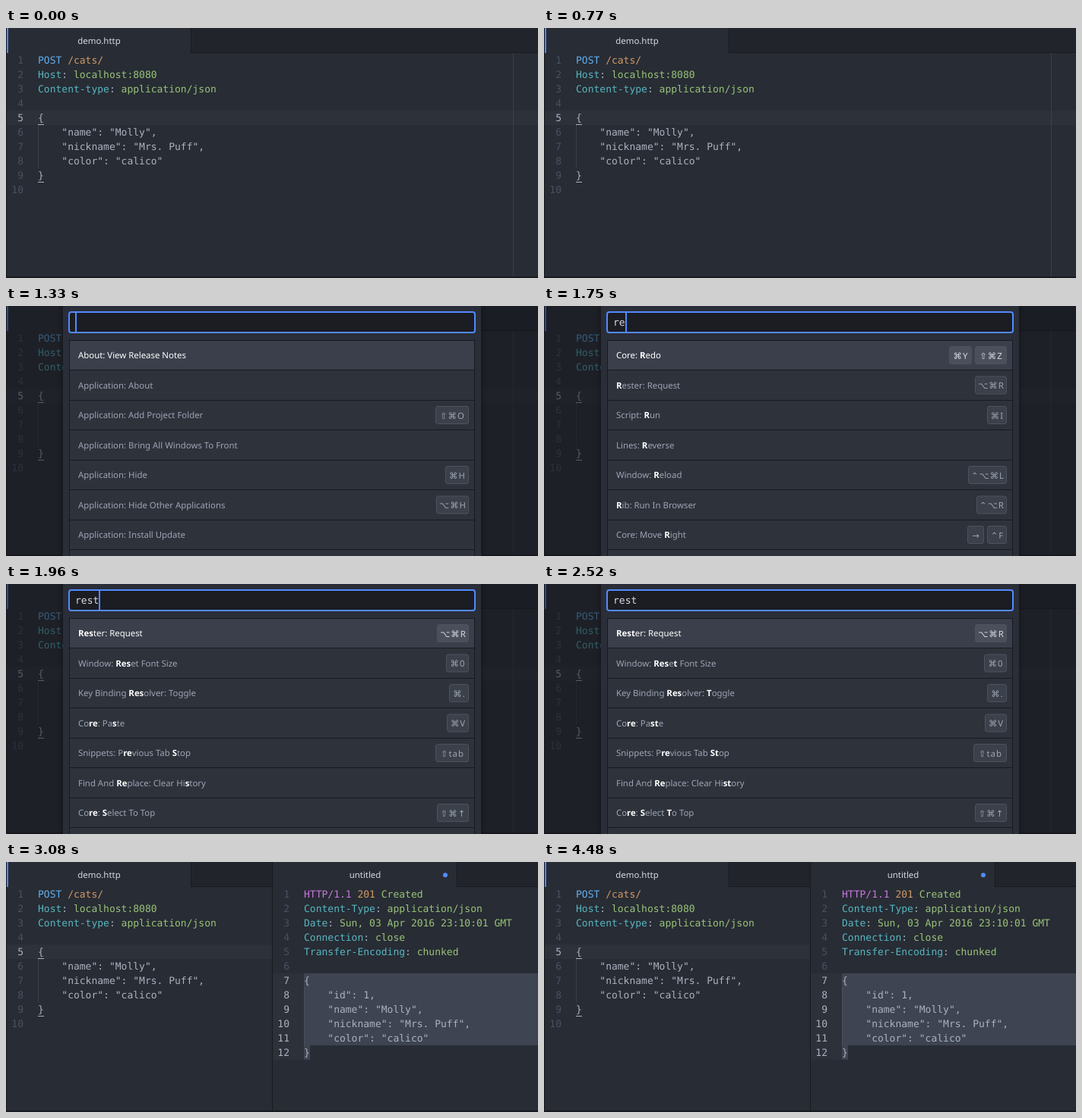
Recreate the animation shown at these times as an HTML page. Size 700 by 330 pixels, loop 4550 ms.

```html
<!DOCTYPE html>
<html lang="en">
<head>
<meta charset="utf-8">
<title>HTTP request demo</title>
<style>
  html, body { margin: 0; width: 700px; height: 330px; overflow: hidden; background: #282c34; }
  svg { display: block; }
  text { white-space: pre; text-rendering: geometricPrecision; }
  .code { font: 13px "DejaVu Sans Mono", monospace; }
  .ui { font: 11.4px "Noto Sans", "DejaVu Sans", sans-serif; }
  .key { font: 11.4px "Noto Sans", "DejaVu Sans", sans-serif; letter-spacing: 1px; }
  .hit { font-weight: 700; fill: #fff; }
</style>
</head>
<body>
<svg id="stage" width="700" height="330" viewBox="0 0 700 330" xmlns="http://www.w3.org/2000/svg"></svg>
<script>
const LOOP = 4550, LINE = 19, TOP = 33, CHAR = 7.826;
const C = {
  bg: '#282c34', bar: '#21252b', edge: '#181a1f', row: '#2c313a', sel: '#3e4451',
  guide: '#3b4048', dim: '#495162', grey: '#abb2bf', ui: '#9da5b4', white: '#d7dae0',
  blue: '#61afef', cyan: '#56b6c2', green: '#98c379', orange: '#d19a66',
  purple: '#c678dd', accent: '#528bff'
};

const esc = s => s.replace(/&/g, '&amp;').replace(/</g, '&lt;');
const rect = (x, y, w, h, fill, more = '') =>
  `<rect x="${x}" y="${y}" width="${w}" height="${h}" fill="${fill}" ${more}/>`;
const text = (x, y, s, cls, fill, more = '') =>
  `<text x="${x}" y="${y}" class="${cls}" fill="${fill}" ${more}>${s}</text>`;
const group = (id, body) => `<g id="${id}">${body}</g>`;
const lineTop = n => TOP + (n - 1) * LINE;

// A code line is a list of [colour, text] spans.
function codeLine(x, n, spans) {
  const body = spans.map(([c, s]) => `<tspan fill="${C[c]}">${esc(s)}</tspan>`).join('');
  return text(x, lineTop(n) + 14, body, 'code', C.grey);
}
const header = (k, v) => [['cyan', k], ['grey', ': '], ['green', v]];
const plain = s => [['grey', s]];

function editor(left, lines, bright) {
  return lines.map((spans, i) => {
    const n = i + 1;
    return text(left + 23, lineTop(n) + 14, n, 'code', bright(n) ? C.grey : C.dim, 'text-anchor="end"')
      + codeLine(left + 42, n, spans);
  }).join('');
}
const tabBar = (x, w, tabW, title) =>
  rect(x, 0, w, 32, C.bar) + rect(x, 32, w, 1, C.edge) + rect(x, 0, tabW, 33, C.bg)
  + rect(x + tabW, 0, 1, 33, C.edge)
  + text(x + 121.5, 21, title, 'ui', C.white, 'text-anchor="middle"');

const cat = ['    "name": "Molly",', '    "nickname": "Mrs. Puff",', '    "color": "calico"', '}'].map(plain);
const request = [
  [['blue', 'POST'], ['orange', ' /cats/']],
  header('Host', 'localhost:8080'),
  header('Content-type', 'application/json'),
  [], plain('{'), ...cat, []
];
const response = [
  [['purple', 'HTTP/1.1'], ['orange', ' 201'], ['green', ' Created']],
  header('Content-Type', 'application/json'),
  header('Date', 'Sun, 03 Apr 2016 23:10:01 GMT'),
  header('Connection', 'close'),
  header('Transfer-Encoding', 'chunked'),
  [], plain('{'), plain('    "id": 1,'), ...cat
];

const leftPane = rect(0, 0, 700, 330, C.bg)
  + rect(1, lineTop(5), 699, LINE, C.row)
  + rect(667, TOP, 1, 295, C.guide)
  + rect(42, lineTop(6), 1, LINE * 3, C.guide)
  + tabBar(1, 699, 242, 'demo.http') + rect(1, 0, 2, 33, C.accent)
  + editor(0, request, n => n === 5)
  + [5, 9].map(n => rect(42, lineTop(n) + 18, 8, 1, C.grey)).join('');

const rightPane = rect(350, 0, 350, 330, C.bg) + rect(350, 0, 1, 330, C.edge)
  + tabBar(351, 349, 242, 'untitled')
  + rect(351, lineTop(7), 41, LINE * 6, C.row)
  + rect(392, lineTop(7), 308, LINE * 5, C.sel) + rect(392, lineTop(12), 8, LINE, C.sel)
  + rect(392, lineTop(8), 1, LINE * 4, '#4a505c')
  + editor(350, response, n => n >= 7)
  + `<circle id="dot" cx="578" cy="17.3" fill="${C.accent}"/>`;

// Palette entries: label with *matched* parts, then keys as "symbols:width".
const REQ = '⌥⌘R:42';
const lists = {
  all: [
    ['About: View Release Notes'], ['Application: About'],
    ['Application: Add Project Folder', '⇧⌘O:44'], ['Application: Bring All Windows To Front'],
    ['Application: Hide', '⌘H:31'], ['Application: Hide Other Applications', '⌥⌘H:43'],
    ['Application: Install Update']
  ],
  r: [
    ['Core: *R*edo', '⌘Y:30', '⇧⌘Z:42'], ['*R*ester: Request', REQ], ['Script: *R*un', '⌘I:26'],
    ['Lines: *R*everse'], ['Window: *R*eload', '⌃⌥⌘L:51'], ['*R*ib: Run In Browser', '⌃⌥R:40'],
    ['Core: Move *R*ight', '→:22', '⌃F:26']
  ],
  re: [
    ['Core: *Re*do', '⌘Y:30', '⇧⌘Z:42'], ['*Re*ster: Request', REQ], ['Lines: *Re*verse'],
    ['Window: *Re*load', '⌃⌥⌘L:51'], ['Window: *Re*set Font Size', '⌘0:30'],
    ['Find And *Re*place: Clear History'], ['Co*re*: Paste', '⌘V:29']
  ],
  res: [
    ['*Res*ter: Request', REQ], ['Window: *Res*et Font Size', '⌘0:30'],
    ['Key Binding *Res*olver: Toggle', '⌘.:26'], ['Co*re*: Pa*s*te', '⌘V:29'],
    ['Snippets: P*re*vious Tab *S*top', '⇧tab:44'], ['Find And *Re*place: Clear Hi*s*tory'],
    ['Co*re*: *S*elect To Top', '⇧⌘↑:42']
  ],
  rest: [
    ['*Rest*er: Request', REQ], ['Window: *Res*e*t* Font Size', '⌘0:30'],
    ['Key Binding *Res*olver: *T*oggle', '⌘.:26'], ['Co*re*: Pa*st*e', '⌘V:29'],
    ['Snippets: P*re*vious Tab *St*op', '⇧tab:44'], ['Find And *Re*place: Clear Hi*st*ory'],
    ['Co*re*: *S*elect *T*o Top', '⇧⌘↑:42']
  ]
};

function keyCaps(keys, y, on) {
  let right = 609, out = '';
  for (const key of [...keys].reverse()) {
    const [label, w] = key.split(':');
    const x = right - w;
    out += rect(x + .5, y + 8.5, w - 1, 23, on ? '#4a4f5b' : '#3b404a', 'rx="2.5" stroke="#4d525e"')
      + text(x + w / 2 + .5, y + 24.5, label, 'key', on ? C.white : C.ui, 'text-anchor="middle"');
    right = x - 4;
  }
  return out;
}
function listRows(rows) {
  return rows.map(([label, ...keys], i) => {
    const y = 45 + i * 39.5, on = i === 0;
    const body = label.split('*').map((s, k) => k % 2 ? `<tspan class="hit">${s}</tspan>` : s).join('');
    return (on ? rect(84, 46, 532, 38.5, '#3a3f4b') : '')
      + rect(84, Math.round(y + 39), 532, 1, C.edge)
      + text(95, y + 24, body, 'ui', on ? '#fff' : C.ui) + keyCaps(keys, y, on);
  }).join('');
}

const palette = rect(75, -10, 550, 360, '#2b2f37', 'filter="url(#shadow)"')
  + rect(83, 8, 534, 27, '#1b1d23', `rx="3" stroke="${C.accent}" stroke-width="2"`)
  + rect(83.5, 45.5, 533, 300, '#2e323b', `stroke="${C.edge}"`)
  + Object.keys(lists).map(k => group('list-' + k, listRows(lists[k]))).join('')
  + `<text id="query" class="code" x="91" y="26" fill="${C.white}"></text>`
  + group('caret', rect(0, 9, 2, 25, C.accent));

const busy = rect(75, -10, 550, 51, C.bg, 'rx="4" filter="url(#shadow)"')
  + `<path d="M88.5 11.7A7 7 0 0 1 97 22.5" fill="none" stroke="${C.accent}" stroke-width="1.3"/>`
  + `<path d="M92 15.5l2.5 2.5-2.5 2.5-2.5-2.5z" fill="${C.accent}"/>`
  + text(109, 24.5, 'Requesting…', 'ui', C.white)
  + rect(547.5, 8.5, 69, 23, 'url(#button)', `rx="3" stroke="${C.edge}"`)
  + `<path d="M557.5 16l7.5 7.5m0-7.5l-7.5 7.5" stroke="${C.white}" stroke-width="2.4"/>`
  + text(571, 24, 'Cancel', 'ui', C.white);

document.getElementById('stage').innerHTML = `<defs>
  <filter id="shadow" x="-10%" y="-50%" width="120%" height="200%">
    <feDropShadow dx="0" dy="3" stdDeviation="4" flood-color="#000" flood-opacity=".4"/></filter>
  <linearGradient id="button" x2="0" y2="1">
    <stop stop-color="#3e434e"/><stop offset="1" stop-color="#353a44"/></linearGradient></defs>`
  + leftPane + group('cursor', rect(50, 109, 2, LINE, C.accent)) + group('right', rightPane)
  + rect(0, 0, 1, 330, C.edge) + rect(0, 328, 700, 2, C.edge)
  + rect(0, 0, 700, 330, '#16181d', 'id="shade"')
  + group('palette', palette) + group('busy', busy);

// Each step lists only what changes at that time.
const steps = [
  [0, { cursor: 0, right: 0, palette: 0, busy: 0, shade: 0, list: 'all', query: '', caret: 0, dot: 0 }],
  [350, { cursor: 1 }],
  [770, { cursor: 0 }],
  [1190, { palette: 1 }],
  [1260, { shade: .28, caret: 1 }],
  [1330, { shade: .56 }],
  [1610, { query: 'r' }],
  [1750, { query: 're', list: 'r' }],
  [1820, { list: 're' }],
  [1890, { query: 'res' }],
  [1960, { query: 'rest', list: 'res' }],
  [2030, { list: 'rest' }],
  [2520, { caret: 0 }],
  [2590, { palette: 0, busy: 1, cursor: 1, shade: .45 }],
  [2660, { busy: 0, right: 1, shade: 0 }],
  [2940, { dot: 1 }],
  [3010, { dot: 2 }],
  [3080, { dot: 3, cursor: 0 }],
  [3500, { cursor: 1 }],
  [3920, { cursor: 0 }],
  [4340, { cursor: 1 }],
  [4480, { cursor: 0 }]
];

const el = id => document.getElementById(id);
const show = (id, on) => { el(id).style.display = on ? '' : 'none'; };

function draw(t) {
  const s = Object.assign({}, ...steps.filter(([at]) => at <= t).map(([, change]) => change));
  for (const id of ['cursor', 'right', 'palette', 'busy', 'caret']) show(id, s[id]);
  for (const k in lists) show('list-' + k, k === s.list);
  el('shade').setAttribute('opacity', s.shade);
  el('dot').setAttribute('r', s.dot);
  el('query').textContent = s.query;
  el('caret').setAttribute('transform', `translate(${Math.round(91 + s.query.length * CHAR)} 0)`);
}

const start = performance.now();
function tick() {
  draw((performance.now() - start) % LOOP);
  requestAnimationFrame(tick);
}
tick();
</script>
</body>
</html>
```
